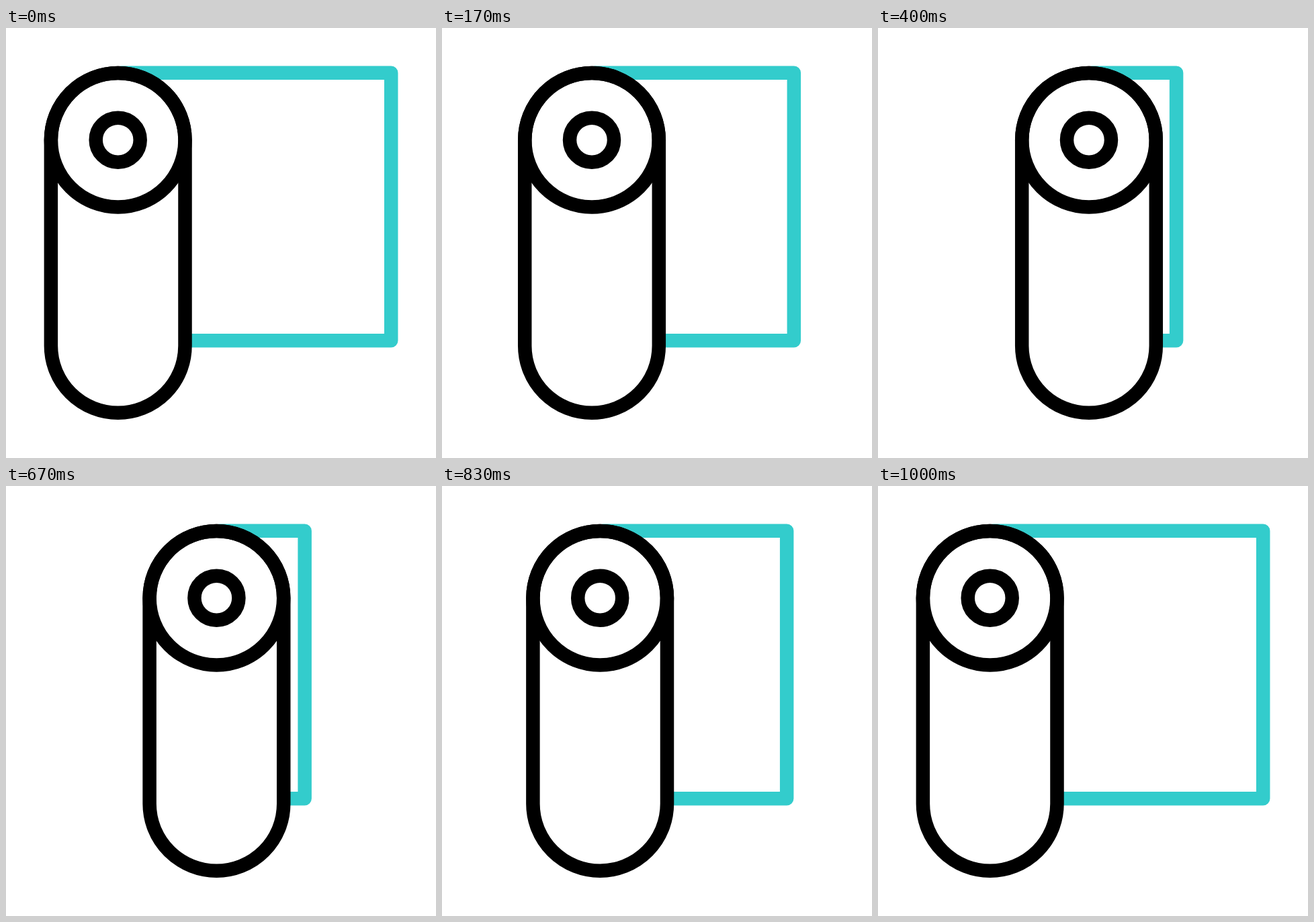
An HTML page without scripts for the animation above (1670 ms loop, 640 px wide and 640 px high).

```html
<!DOCTYPE html>
<html lang="en">
<head>
<meta charset="utf-8">
<title>Paper roll</title>
<style>
  @property --t {
    syntax: "<number>";
    inherits: true;
    initial-value: 0;
  }

  html, body {
    margin: 0;
    width: 100%;
    height: 100%;
    overflow: hidden;
    background: #fff;
  }

  svg {
    display: block;
    width: 100%;
    height: 100%;
    fill: none;
    stroke: #000;
    stroke-width: 20.5;
    stroke-linejoin: round;
    animation: tick 1670ms steps(50) -5ms infinite;

    /* progress of rolling up (a) and unrolling (b), eased into p */
    --a: clamp(0, (var(--t) - .37) / 11, 1);
    --b: clamp(0, (var(--t) - 19.62) / 10.28, 1);
    --p: (var(--a) * var(--a) * (3 - 2 * var(--a))
        - var(--b) * var(--b) * (3 - 2 * var(--b)));
  }

  @keyframes tick {
    from { --t: 0; }
    to { --t: 50; }
  }

  .sheet {
    stroke: #33cccc;
    x: calc(171.7px + 147.3px * var(--p));
    width: calc(401.5px - 276.4px * var(--p));
  }

  .roll {
    transform: translateX(calc(147.3px * var(--p)));
  }

  .body { fill: #fff; }
</style>
</head>
<body>
<svg viewBox="0 0 640 640">
  <rect class="sheet" y="66.7" height="398.5"/>
  <g class="roll">
    <path class="body" d="M66.9 166.7V473a99.8 99.8 0 0 0 199.6 0V166.7a99.8 99.8 0 0 0-199.6 0z"/>
    <circle cx="166.7" cy="166.7" r="99.8"/>
    <circle cx="166.7" cy="166.7" r="33"/>
  </g>
</svg>
</body>
</html>
```
